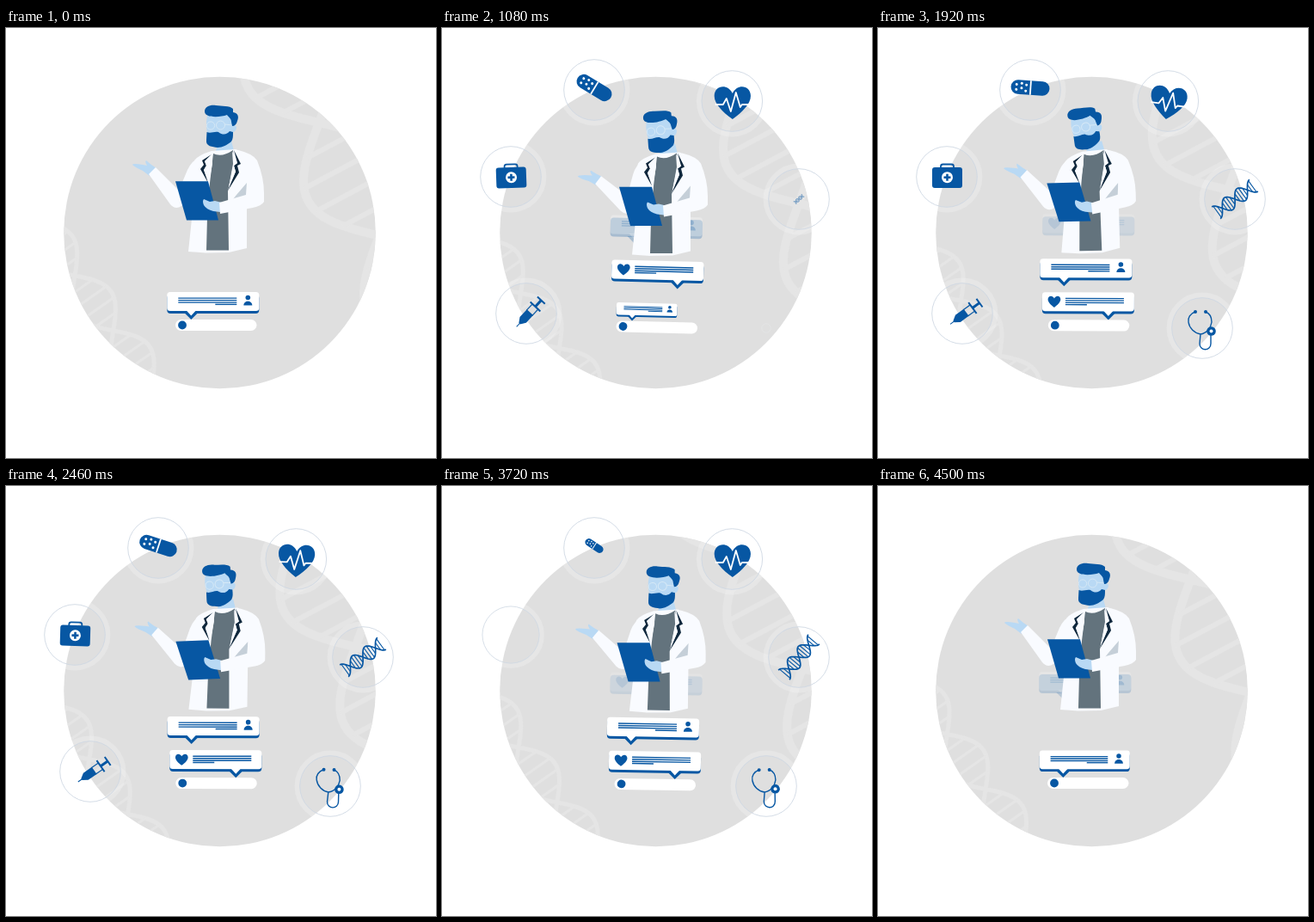
An HTML page with a canvas that plays this animation: 500x500 px, repeating every 4.53 s.

```html
<!DOCTYPE html>
<html lang="en">
<head>
<meta charset="utf-8">
<title>Online doctor</title>
<style>
  html, body { margin: 0; width: 100%; height: 100%; overflow: hidden; background: #fff; }
  canvas { display: block; width: 500px; height: 500px; }
</style>
</head>
<body>
<canvas id="stage"></canvas>
<script>
const LOOP = 4530, STEP = 30;
const BLUE = '#0757a3', SKIN = '#b9d9f4', COAT = '#f9fbff', SHIRT = '#63737d', DARK = '#10283d', GREY = '#dfdfdf';
const canvas = document.getElementById('stage');
const ctx = canvas.getContext('2d');
const dpr = window.devicePixelRatio || 1;
canvas.width = canvas.height = 500 * dpr;

const clamp = v => Math.max(0, Math.min(1, v));
const easeOut = u => 1 - (1 - clamp(u)) ** 2;
const easeIn = u => clamp(u) ** 2;
const smooth = u => (1 - Math.cos(Math.PI * clamp(u))) / 2;

// Eased interpolation through [time, value] pairs.
function track(t, keys) {
  if (t <= keys[0][0]) return keys[0][1];
  for (let i = 1; i < keys.length; i++) {
    const [t0, a] = keys[i - 1], [t1, b] = keys[i];
    if (t <= t1) return a + (b - a) * smooth((t - t0) / (t1 - t0));
  }
  return keys[keys.length - 1][1];
}

function group(draw, { x = 0, y = 0, deg = 0, px = 0, py = 0, scale = 1, alpha = 1 }) {
  if (scale <= 0 || alpha <= 0) return;
  ctx.save();
  ctx.globalAlpha *= alpha;
  ctx.translate(x + px, y + py);
  ctx.rotate(deg * Math.PI / 180);
  ctx.scale(scale, scale);
  ctx.translate(-px, -py);
  draw();
  ctx.restore();
}
function fill(color, d) {
  ctx.fillStyle = color;
  ctx.fill(new Path2D(d));
}
function stroke(color, width, d) {
  ctx.strokeStyle = color;
  ctx.lineWidth = width;
  ctx.stroke(new Path2D(d));
}
function disc(color, x, y, r) {
  ctx.fillStyle = color;
  ctx.beginPath();
  ctx.arc(x, y, r, 0, 7);
  ctx.fill();
}
function ring(color, width, x, y, r) {
  ctx.strokeStyle = color;
  ctx.lineWidth = width;
  ctx.beginPath();
  ctx.arc(x, y, r, 0, 7);
  ctx.stroke();
}
function box(color, x, y, w, h, r) {
  ctx.fillStyle = color;
  ctx.beginPath();
  ctx.roundRect(x, y, w, h, r);
  ctx.fill();
}

// Two crossing strands along the x axis, crossing at multiples of half.
function helix(color, from, to, half, amp, width, rungWidth, rungs) {
  ctx.strokeStyle = color;
  ctx.lineWidth = width;
  const wave = x => amp * Math.sin(Math.PI * x / half);
  ctx.beginPath();
  for (const side of [1, -1]) {
    for (let x = from; x <= to; x += half / 24) {
      x === from ? ctx.moveTo(x, side * wave(x)) : ctx.lineTo(x, side * wave(x));
    }
  }
  ctx.stroke();
  ctx.lineWidth = rungWidth;
  ctx.beginPath();
  const gap = half / (rungs + 1);
  for (let k = Math.ceil(from / gap); k * gap <= to; k++) {
    if (k % (rungs + 1) === 0) continue;
    const h = wave(k * gap);
    ctx.moveTo(k * gap, -h);
    ctx.lineTo(k * gap, h);
  }
  ctx.stroke();
}

function backdrop(t) {
  disc(GREY, 248.5, 238, 181.3);
  ctx.save();
  ctx.beginPath();
  ctx.arc(248.5, 238, 181.3, 0, 7);
  ctx.clip();
  const drift = Math.sin(Math.PI * t / LOOP);
  group(() => helix('#e5e5e5', -149, 340, 149, 54, 10, 6, 4), { x: 364 - 28 * drift, y: 110 - 55 * drift, deg: 62 });
  group(() => helix('#e5e5e5', -156, 200, 78, 24, 5, 3, 4), { x: 80 + 17 * drift, y: 288 + 30 * drift, deg: 55 });
  ctx.restore();
}

// ---- Chat ----
const HEART = 'M0 6C-4 3 -7 0 -7 -3C-7 -7 -2 -8 0 -4C2 -8 7 -7 7 -3C7 0 4 3 0 6Z';

function bubble(isHeart) {
  const tail = isHeart ? 77 : 28;
  box(BLUE, 0, 3, 107, 22, 4);
  fill(BLUE, `M${tail - 8} 24H${tail + 8}L${tail} 32Z`);
  box('#fff', 0, 0, 107, 22, 3.5);
  fill('#fff', `M${tail - 6} 21H${tail + 6}L${tail} 27.5Z`);
  const left = isHeart ? 27 : 13;
  for (let i = 0; i < 3; i++) box(BLUE, left, 6.4 + i * 2.5, 68, 1.4, 0);
  box(BLUE, isHeart ? left : left + 43, 13.7, 25, 1.4, 0);
  if (isHeart) {
    group(() => fill(BLUE, HEART), { x: 14, y: 11.5, scale: 1.05 });
  } else {
    disc(BLUE, 94, 6.5, 2.8);
    fill(BLUE, 'M89 15.5C89 9 99 9 99 15.5Z');
  }
}

const SENT = [-1000, 230, 976, 1600, 2600, 3400, 4285];
const SLOTS = [307, 268, 216];

function message(t, i) {
  if (t < SENT[i]) return;
  const isHeart = i % 2 === 1;
  const pushed = k => SENT[i + k] === undefined ? 0 : smooth((t - SENT[i + k]) / 110);
  const first = pushed(1), second = pushed(2);
  const y = SLOTS[0] + (SLOTS[1] - SLOTS[0]) * first + (SLOTS[2] - SLOTS[1]) * second;
  let alpha = 1;
  if (second > 0) {
    const age = t - SENT[i + 2];
    alpha = age < 90 ? 1 - age / 120 : 0.27 * (1 - clamp((age - 90) / 400));
  }
  if (i === 5) alpha *= 1 - clamp((t - 4285) / 150);
  group(() => bubble(isHeart), {
    x: isHeart ? 190 : 187.3, y, px: isHeart ? 77 : 28, py: 31,
    scale: easeOut((t - SENT[i]) / 250), alpha
  });
}

function chat(t, sway) {
  group(() => {
    SENT.forEach((_, i) => message(t, i));
    box('#fff', 197, 339, 94.5, 13, 6.5);
    disc(BLUE, 205, 345.5, 4.9);
  }, { x: 5.5 * sway, y: 2.5 * sway, deg: 1.5 * sway, px: 244, py: 345 });
}

// ---- Doctor ----
function head() {
  fill(SKIN, 'M234 102L259 99L264 113Q270 113 267 119Q265 122 262 121L261 128L236 127Q231 115 234 102Z');
  ring('#d5e8f6', 1, 238, 113.5, 4.6);
  ring('#d5e8f6', 1, 249.5, 113, 5);
  stroke('#d5e8f6', 1, 'M254 112L264 113');
  fill(BLUE, 'M231 97C231 91 238 89 244 90C251 91 260 90 264 94L264 98C270 99 271 103 269 108C268 112 266 114 263 114L262 109C262 105 258 103 257 101C249 104 231 105 231 97Z');
  fill(BLUE, 'M233.5 121C238 123 242 120 247 121C252 125 257 124 260 120L264 121C264 126 264 129 262 132C257 136 252 139 246 139C240 138 232 138 233 130Z');
}

function farArm() {
  fill(SKIN, 'M175 163L167 172L159 166Q150 162 147 159Q147 157 159 159L164 160Q161 155 163 154L169 159Z');
  fill(COAT, 'M174 162L166 170L191 205Q197 212 204 207L222 194L226 150Q216 154 211 165L201 189Z');
}

function coat() {
  fill(SKIN, 'M246 136L262 131L265 143Q256 152 243 146Z');
  fill(COAT, 'M239 143Q223 148 219 154L213 178L216 222L212 260L233 261.5L259 261L280 256V211L284 148L267 141Z');
  fill(SHIRT, 'M241 146Q251 151 264 142L265 156L258 190L259 258.5H233L234 220L237 180Z');
  fill(DARK, 'M239 147L228 154L230 159L226 164L235 180L230 165L233 160L231 155Z');
  fill(COAT, 'M240 146L231 155L233 160L230 165L236 180L240 158Z');
  fill(DARK, 'M265 142L273 158L269 160L271 168L258 189L267 167L265 160L269 157Z');
  fill(COAT, 'M263 143L269 157L265 160L267 167L259 185L264 158Z');
}

function clipboard() {
  fill(BLUE, 'M197 178.3H235L247 223.5H210Z');
}

function nearArm() {
  fill('#c5cfd8', 'M280 180L268 194L260 204L280 200Z');
  fill(SKIN, 'M251 203L249 214L241 213Q233 211 230 206Q228 201 230 199L237 202L243 201Z');
  fill(COAT, 'M270 142Q287 146 292 154Q300 174 300 192V202Q297 207 287 209L249 216L248 203L279 194L280 179Z');
}

function doctor(t, sway) {
  const lean = track(t, [[0, 0], [450, 1.4], [1080, 0], [1920, -1.4], [2970, 2.8], [3720, 0.7], [4500, 0]]);
  const nod = track(t, [[0, 0], [450, -7], [1080, -7], [1920, -10], [2970, -2.5], [3720, -1], [4500, 0]]);
  const reach = track(t, [[0, 0], [450, -4.5], [1080, -7.6], [1920, -1], [2970, -7], [3720, -5], [4500, 0]]);
  const tilt = track(t, [[0, 0], [450, -4.4], [1080, 0], [1920, 0], [2970, -5.8], [3720, -0.7], [4500, 0]]);
  group(() => {
    group(farArm, { deg: reach, px: 225, py: 150 });
    coat();
    group(head, { y: 1.5 * sway, deg: nod - lean * 0.4, px: 254, py: 148 });
    group(clipboard, { y: -0.4 * reach, deg: tilt, px: 222, py: 200 });
    nearArm();
  }, { x: 9 * sway, y: 3.5 * sway, deg: lean, px: 246, py: 260 });
}

// ---- Icons ----
function syringe() {
  stroke(BLUE, 1, 'M-21 0H-14');
  fill(BLUE, 'M-16 -1L-10 -5H2V5H-10L-16 1Z');
  stroke(BLUE, 1.2, 'M1 -4.5H11V4.5H1');
  stroke(BLUE, 2, 'M11 -8V8M21 -6V6');
  stroke(BLUE, 3, 'M11 0H21');
}
function medkit() {
  ctx.strokeStyle = BLUE;
  ctx.lineWidth = 1.8;
  ctx.beginPath();
  ctx.roundRect(-7.5, -14.5, 15, 8, 2.5);
  ctx.stroke();
  box(BLUE, -17.5, -11, 35, 24, 3);
  disc('#fff', 0, 0.7, 6.5);
  box(BLUE, -1.3, -3.3, 2.6, 8, 0);
  box(BLUE, -4, -0.6, 8, 2.6, 0);
}
function bandage() {
  box(BLUE, -22.5, -8.3, 45, 16.6, 8.3);
  box('#fff', -0.5, -8.3, 1.8, 16.6, 0);
  for (const [x, y] of [[-16, -3], [-10, -4.5], [-4.5, -3], [-16, 3], [-10, 1], [-5, 4]]) disc('#fff', x, y, 1.5);
}
function heartbeat() {
  group(() => fill(BLUE, HEART), { y: 3, scale: 3.02 });
  ctx.lineJoin = 'round';
  stroke('#fff', 1.8, 'M-20 4H-11L-7 -3L-2 12L4 -10L9 7L11 4H20');
}
function dna() {
  helix(BLUE, -27, 27, 18, 8.5, 1.7, 1.1, 4);
}
function stethoscope() {
  disc(BLUE, -8, -19, 2);
  disc(BLUE, 4, -19, 2);
  stroke(BLUE, 1.4, 'M-8 -19C-14 -17 -17 -12 -16 -7C-15 0 -9 6 -2 7C5 6 10 0 11 -7C11 -12 9 -17 4 -19M-2 7L-3 18C-3 27 10 27 10 18V7');
  disc(BLUE, 10.5, 3.5, 5.3);
  disc('#fff', 10.5, 3.5, 2);
}

const ICONS = [
  { x: 98, y: 332, dx: 3, draw: syringe, turn: [[450, -42], [1080, -47], [1920, -36], [2970, -34], [3500, -40]] },
  { x: 80, y: 173, dx: 0.5, draw: medkit, turn: [[450, 0], [1080, -2], [1920, 0], [2970, 3], [3600, 0]] },
  { x: 177, y: 72, dx: 0, dy: -2.5, draw: bandage, turn: [[1080, 31], [1920, 4], [2970, 31], [3720, 33]] },
  { x: 337.3, y: 85, dx: 0.5, draw: heartbeat, turn: [[1080, 0], [1920, 8], [2970, -2], [3720, 0]] },
  { x: 415, y: 199, dx: 0, draw: dna, turn: [[1080, -42], [1920, -36], [2970, -36], [3720, -50]] },
  { x: 377, y: 349, dx: 0, draw: stethoscope, turn: [[1500, -3], [1920, 0], [2970, 3], [3720, -1], [4200, 0]] }
];

function badge(t, icon, i) {
  const opens = 6 + 212 * i, closes = 3518 + 152 * i;
  const size = (inAt, outAt) => easeOut((t - inAt) / 200) * (1 - easeIn((t - outAt) / 200));
  const { x, y, dx, dy = 0 } = icon;
  group(() => {
    ring('rgba(255,255,255,.2)', 6, 0, 0, 38.5);
    ring('#d0d9e4', 0.9, 0, 0, 35.3);
  }, { x, y, scale: size(opens, closes) });
  group(icon.draw, { x: x + dx, y: y + dy, deg: track(t, icon.turn), scale: size(opens + 200, closes - 240) });
}

function render(now) {
  const t = Math.floor(now % LOOP / STEP) * STEP;
  ctx.setTransform(dpr, 0, 0, dpr, 0, 0);
  ctx.fillStyle = '#fff';
  ctx.fillRect(0, 0, 500, 500);
  const sway = track(t, [[0, 0], [1090, 1], [2200, 0], [3700, 0.65], [4500, 0]]);
  backdrop(t);
  ICONS.forEach((icon, i) => badge(t, icon, i));
  chat(t, sway);
  doctor(t, sway);
}

const start = performance.now();
function tick() {
  render(performance.now() - start);
  requestAnimationFrame(tick);
}
tick();
</script>
</body>
</html>
```
